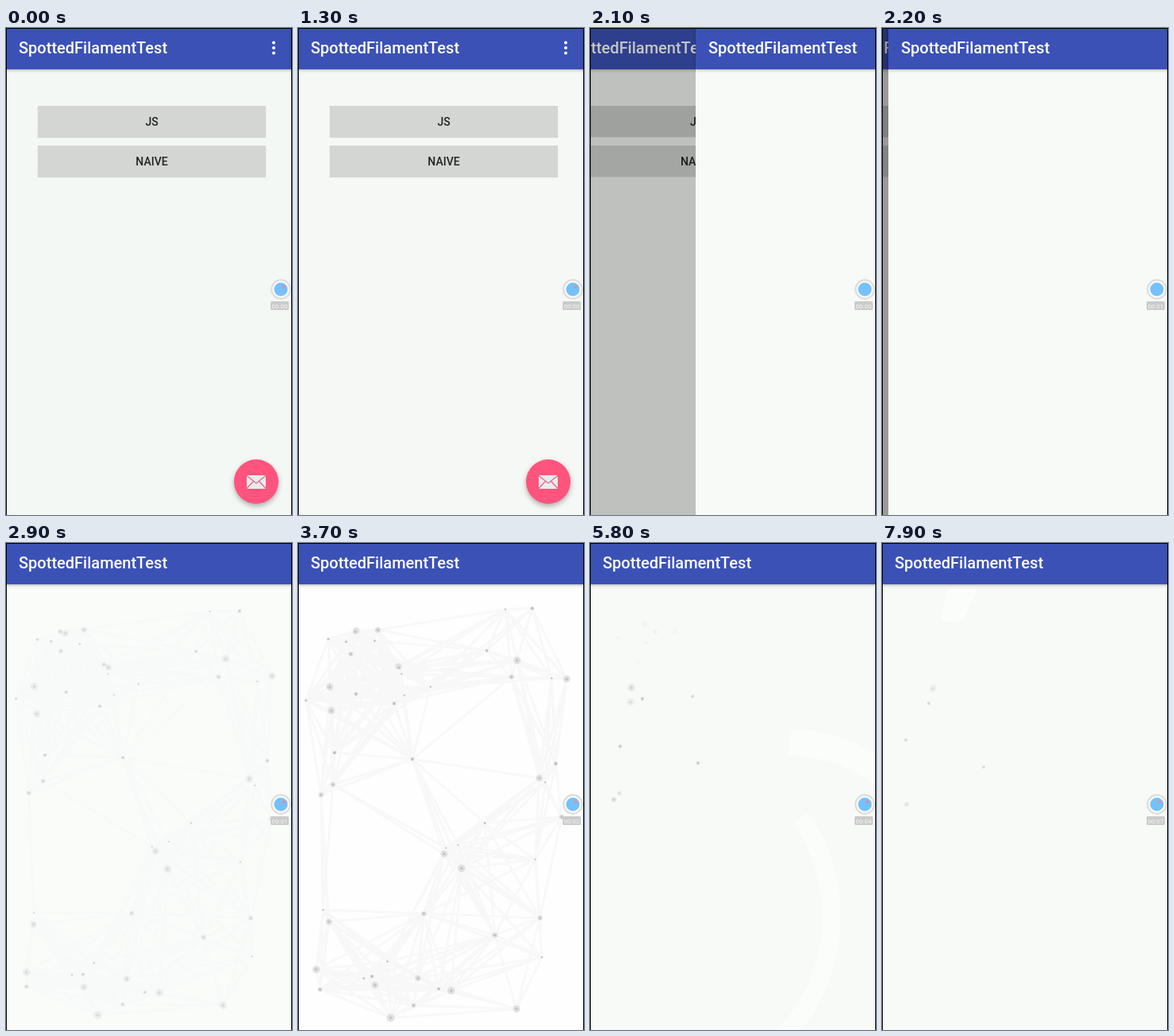
Animation of 360 by 613 pixels, one loop 8 s. Source, as an HTML page with a canvas:

```html
<!DOCTYPE html>
<html lang="en">
<head>
<meta charset="utf-8">
<title>Dot web</title>
<style>
html, body { margin: 0; width: 100%; height: 100%; overflow: hidden; background: #000; }
#stage { position: absolute; left: 0; top: 0; width: 360px; height: 613px; overflow: hidden;
  font-family: Roboto, sans-serif; font-weight: 500; }
.page, #dim, canvas, svg { position: absolute; left: 0; top: 0; width: 360px; height: 613px; }
#dim { background: #000; }
.bar { position: absolute; left: 0; top: 0; width: 360px; height: 52px; background: #3b51b6;
  color: #fff; font-size: 20px; line-height: 51px; text-indent: 16px; white-space: nowrap;
  box-shadow: 0 1px 4px rgba(0, 0, 0, .3); }
.button { position: absolute; left: 40px; width: 287px; height: 39px; background: #d3d6d3;
  color: #222; font-size: 14px; line-height: 40px; text-align: center;
  box-shadow: 0 1px 1px rgba(0, 0, 0, .14); }
#ripple { position: absolute; inset: 0; background: rgba(70, 50, 40, .045); }
#edge { position: absolute; inset: 0; border: solid #000; border-width: 1px 1px 0; }
</style>
</head>
<body>
<div id="stage">
  <div class="page" id="home">
    <div class="bar">SpottedFilamentTest</div>
    <div class="button" style="top:98px">JS<div id="ripple"></div></div>
    <div class="button" style="top:148px">NAIVE</div>
    <svg>
      <path d="M337 18.5v0m0 6.5v0m0 6.5v0" stroke="#fff" stroke-width="4" stroke-linecap="round"/>
      <circle cx="315" cy="571" r="28" fill="#ff547d" style="filter:drop-shadow(0 3px 3px rgba(0,0,0,.3))"/>
      <path d="M303 563h24v17h-24z" fill="#ebebeb"/>
      <path d="M303 563.5l12 9.5 12-9.5M303 579.5l8.5-9M327 579.5l-8.5-9" fill="none" stroke="#e0678a" stroke-width="1.2"/>
    </svg>
  </div>
  <div id="dim"></div>
  <div class="page" id="web">
    <canvas id="canvas" width="360" height="613"></canvas>
    <div class="bar">SpottedFilamentTest</div>
  </div>
  <svg>
    <circle cx="346" cy="329" r="11.8" fill="#fafafa" stroke="#dcdddc" stroke-width="2.2"/>
    <circle cx="346" cy="329" r="8.5" fill="#74c1fb"/>
    <circle id="lamp" cx="349.5" cy="326" r="2.1" fill="#e08d98"/>
    <rect x="333" y="344" width="23" height="11" rx="1.5" fill="#cacbca"/>
    <text id="clock" x="344.5" y="352.5" text-anchor="middle" font-size="8" font-weight="400" fill="#f6f6f6"></text>
  </svg>
  <div id="edge"></div>
</div>
<script>
const LOOP = 8000, OPEN = 2100, FULL = 3700;
const $ = id => document.getElementById(id);
const ctx = $('canvas').getContext('2d');
const ramp = (t, a, b) => Math.max(0, Math.min(1, (t - a) / (b - a)));
const mix = (a, b, k) => a + (b - a) * k;

let seed = 7;
const random = () => (seed = seed * 16807 % 2147483647) / 2147483647;
const spread = size => (random() - .5) * size;

// Dots that outlive the web: x, y, radius, drift per 2.1 s; the first five last longest.
const dots = [
  [40, 181, 4.5, 12, 1], [46, 264, 2.3, -8, -8], [29, 317, 3.3, 1, 6],
  [73, 190, 2.2, -7, 6], [144, 272, 2.2, -8, 5],
  [42, 211, 4.5, 9, -11], [44, 304, 3, -7, 11], [121, 202, 2.2, 8, -9]
].map(([x, y, r, dx, dy], i) => ({ x, y, r, dx, dy, gone: i < 5 ? 11000 : 7600 }));

// Scattered dots: centre, size and count of each cluster. Those far from the corner go first.
for (const [cx, cy, w, h, count] of [
  [95, 135, 170, 150, 13], [275, 125, 150, 120, 7], [285, 335, 100, 150, 6],
  [195, 380, 30, 60, 4], [175, 520, 310, 160, 18]
])
  for (let i = 0; i < count; i++) {
    const x = cx + spread(w), y = cy + spread(h);
    dots.push({ x, y, r: 1.2 + 3.8 * random() ** 1.6, dx: spread(24), dy: spread(24),
      gone: Math.max(4600, 6700 - 5 * Math.hypot(x, y)) });
  }

function disc(x, y, r, shade, alpha) {
  ctx.globalAlpha = alpha;
  ctx.fillStyle = shade;
  ctx.beginPath();
  ctx.arc(x, y, r, 0, 7);
  ctx.fill();
}

function arc(x, y, r, from, to, width) {
  ctx.lineWidth = width;
  ctx.beginPath();
  ctx.arc(x, y, r, from, to);
  ctx.stroke();
}

function drawGlow(t) {
  ctx.strokeStyle = ctx.fillStyle = '#fdfefd';
  ctx.globalAlpha = .75 * ramp(t, 5200, 5600) * (1 - ramp(t, 6100, 6600));
  arc(250, 445, 194, -Math.PI / 2, -.8, 33);
  arc(84, 470, 220, -.6, .75, 23);
  ctx.globalAlpha = .8 * ramp(t, 7400, 7800);
  ctx.fill(new Path2D('M83 58H120L101 100L74 97Z'));
}

function drawWeb(t) {
  const white = t < FULL ? ramp(t, 2300, FULL) : 1 - ramp(t, 3900, 5600);
  ctx.globalAlpha = 1;
  ctx.fillStyle = `rgb(${mix(248, 253, white)},${mix(250, 254, white)},${mix(247, 253, white)})`;
  ctx.fillRect(0, 0, 360, 613);
  drawGlow(t);

  const enter = ramp(t, 2500, 3300);
  const step = (t - FULL) / 2100;
  const spots = dots.map(({ x, y, r, dx, dy, gone }) => ({
    x: x + dx * step, y: y + dy * step, r, a: enter * (1 - ramp(t, FULL, gone))
  }));

  ctx.globalAlpha = enter * (1 - ramp(t, 3800, 5200));
  ctx.strokeStyle = '#f8f8f9';
  ctx.lineWidth = 3;
  ctx.beginPath();
  spots.forEach((p, i) => spots.slice(i + 1).forEach(q => {
    if (Math.hypot(p.x - q.x, p.y - q.y) > 165) return;
    ctx.moveTo(p.x, p.y);
    ctx.lineTo(q.x, q.y);
  }));
  ctx.stroke();

  for (const { x, y, r, a } of spots) {
    disc(x, y, r, r > 2.5 ? '#dfe0df' : '#cecfce', a);
    disc(x, y, Math.min(1.5, r * .6), '#bfc0bf', a);
  }
}

function draw(t) {
  // The new page slides in fast and settles within three steps.
  const x = t < OPEN ? 360 : Math.max(0, 133 - (t - OPEN) * 1.25);
  const cover = (1 - x / 360) ** 1.2;
  $('home').style.background = t < 900 ? '#f4f8f5' : '#f6f8f6';
  $('home').style.transform = `translateX(${-86 * cover}px)`;
  $('dim').style.opacity = .39 * cover;
  $('web').style.transform = `translateX(${x}px)`;
  $('ripple').style.clipPath = `circle(${ramp(t, 1600, 2000) * 260}px at 183px 20px)`;

  $('lamp').style.opacity = t < 2050 || Math.abs(t % 1000 - 300) > 250 ? 1 : 0;
  $('clock').textContent = '00:0' + Math.max(0, Math.floor((t - 1250) / 950));
  if (x < 360) drawWeb(t);
}

function frame() {
  const t = performance.now() % LOOP;
  draw(Math.floor(t / 100) * 100);
  requestAnimationFrame(frame);
}
frame();
</script>
</body>
</html>
```
